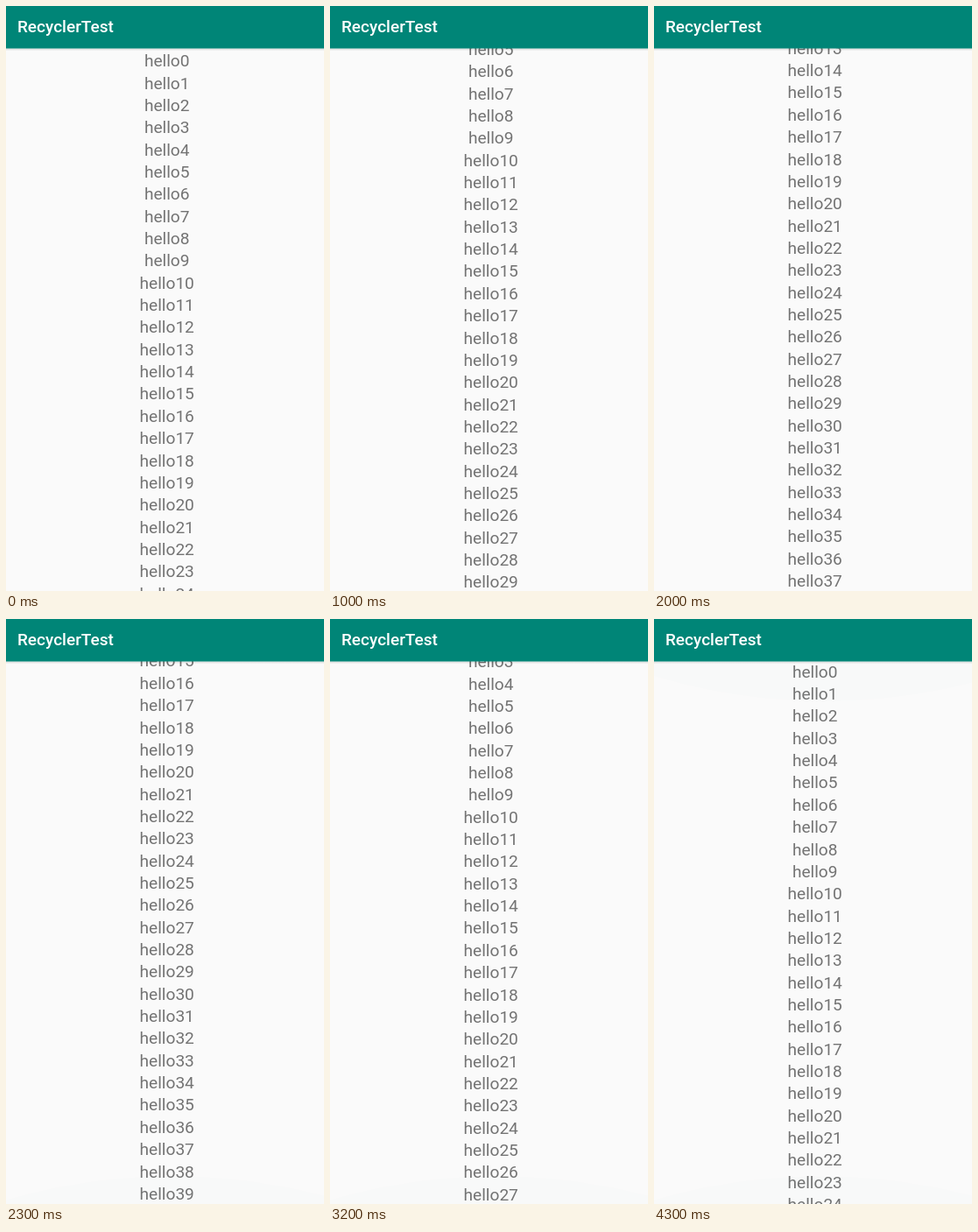
An HTML page with a canvas that plays this animation: 363x668 px, repeating every 4600 ms.

```html
<!DOCTYPE html>
<html lang="en">
<head>
<meta charset="utf-8">
<title>RecyclerTest</title>
<style>
  html, body { margin: 0; width: 100%; height: 100%; overflow: hidden; background: #fafafa; }
  canvas { display: block; width: 363px; height: 668px; }
</style>
</head>
<body>
<canvas id="stage"></canvas>
<script>
const WIDTH = 363, HEIGHT = 668, LOOP = 4600, STEP = 100;
const BAR = 48.5, ROW = 25.35, ROWS = 40, FIRST_BASELINE = 69.2;
const END = ROWS * ROW - (HEIGHT - BAR - 0.5);

// [time in ms, value]
const SCROLL = [
  [600, 0], [700, 9], [800, 50], [1000, 140], [1100, 180], [1200, 210], [1300, 228], [1400, 233],
  [1700, 233], [1800, 245], [2000, 344], [2100, 375], [2200, 390], [2300, END],
  [2700, END], [2800, 372], [2900, 305], [3200, 90], [3300, 35], [3400, 0],
  [3800, 0], [4100, 2.5]
];
const TOP_GLOW = [[3300, 0], [3400, 0.03], [3600, 0.07], [3700, 0.075], [3800, 0.075], [4100, 0.006]];
const TOP_DEPTH = [[3300, 52], [3600, 86], [3700, 94]];
const BOTTOM_GLOW = [[2200, 0], [2300, 0.006]];

const canvas = document.getElementById('stage');
const ctx = canvas.getContext('2d');
const scale = window.devicePixelRatio || 1;
canvas.width = WIDTH * scale;
canvas.height = HEIGHT * scale;
ctx.scale(scale, scale);

function valueAt(keys, time) {
  const next = keys.findIndex(([t]) => t > time);
  if (next === 0) return keys[0][1];
  if (next < 0) return keys[keys.length - 1][1];
  const [t0, v0] = keys[next - 1], [t1, v1] = keys[next];
  return v0 + (v1 - v0) * (time - t0) / (t1 - t0);
}

function drawGlow(centerX, centerY, alpha) {
  ctx.fillStyle = `rgba(0, 133, 119, ${alpha})`;
  ctx.beginPath();
  ctx.arc(centerX, centerY, 676, 0, Math.PI * 2);
  ctx.fill();
}

function drawList(scroll) {
  ctx.font = '19.1px Roboto, sans-serif';
  ctx.textAlign = 'center';
  ctx.fillStyle = '#737373';
  for (let i = 0; i < ROWS; i++) {
    const y = FIRST_BASELINE + i * ROW - scroll;
    if (y > BAR - 10 && y < HEIGHT + 20) ctx.fillText('hello' + i, 183.7, y);
  }
}

function drawBar() {
  const shadow = ctx.createLinearGradient(0, BAR, 0, BAR + 3);
  shadow.addColorStop(0, 'rgba(0, 0, 0, 0.13)');
  shadow.addColorStop(1, 'rgba(0, 0, 0, 0)');
  ctx.fillStyle = shadow;
  ctx.fillRect(0, BAR, WIDTH, 3);
  ctx.fillStyle = '#008577';
  ctx.fillRect(0, 0, WIDTH, BAR);
  ctx.font = '500 19px Roboto, sans-serif';
  ctx.textAlign = 'left';
  ctx.fillStyle = '#fff';
  ctx.fillText('RecyclerTest', 13, 30);
}

function draw(time) {
  ctx.fillStyle = '#fafafa';
  ctx.fillRect(0, 0, WIDTH, HEIGHT);
  drawList(valueAt(SCROLL, time));
  drawGlow(195, valueAt(TOP_DEPTH, time) - 676, valueAt(TOP_GLOW, time));
  drawGlow(190, 636 + 676, valueAt(BOTTOM_GLOW, time));
  drawBar();
}

const start = performance.now();
function frame() {
  const time = (performance.now() - start) % LOOP;
  draw(Math.floor(time / STEP) * STEP);
  requestAnimationFrame(frame);
}
frame();
</script>
</body>
</html>
```
